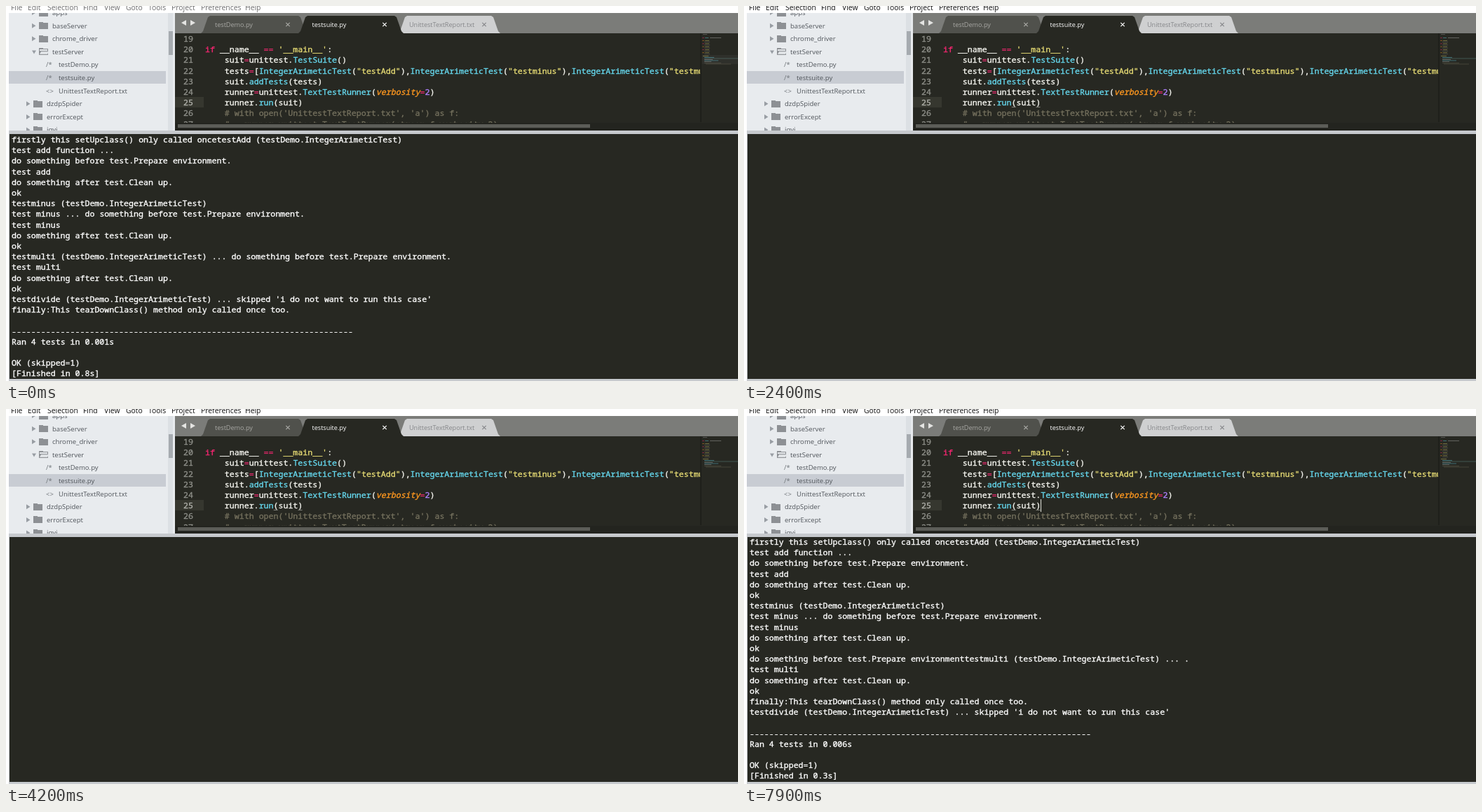
An HTML page with a canvas for the animation above (8 s loop, 1044x536 px).

```html
<!DOCTYPE html>
<html lang="en">
<head>
<meta charset="utf-8">
<title>Test run in an editor</title>
<style>
html, body { margin: 0; width: 100%; height: 100%; overflow: hidden; background: #fff; }
canvas { display: block; width: 1044px; height: 536px; }
</style>
</head>
<body>
<canvas id="stage" width="1044" height="536"></canvas>
<script>
const ctx = document.getElementById('stage').getContext('2d');
const LOOP = 8000, CW = 6.967, LH = 15.2;
const MONO = '11.6px "Noto Sans Mono", "DejaVu Sans Mono", monospace';
const UI = '"Open Sans", "Noto Sans", sans-serif';
const INK = '#f8f8f2', BACK = '#272822', PINK = '#f92672', CYAN = '#66d9ef',
  YELLOW = '#e6db74', ORANGE = '#fd971f', PURPLE = '#ae81ff', NOTE = '#75715e';

function rect(x, y, w, h, color) {
  ctx.fillStyle = color;
  ctx.fillRect(x, y, w, h);
}

function poly(color, ...p) {
  ctx.fillStyle = color;
  ctx.beginPath();
  for (let i = 0; i < p.length; i += 2) ctx.lineTo(p[i], p[i + 1]);
  ctx.fill();
}

function label(text, x, y, size, color) {
  ctx.font = size + 'px ' + UI;
  ctx.fillStyle = color;
  ctx.fillText(text, x, y);
}

// Words sit on the character grid; a hairline stroke adds some weight.
function mono(text, x, y, color, style = '') {
  ctx.font = style + MONO;
  ctx.fillStyle = ctx.strokeStyle = color;
  ctx.lineWidth = 0.35;
  for (const m of text.matchAll(/\S+/g)) {
    const left = x + m.index * CW;
    ctx.fillText(m[0], left, y);
    ctx.strokeText(m[0], left, y);
  }
}

function clip(x, y, w, h, draw) {
  ctx.save();
  ctx.beginPath();
  ctx.rect(x, y, w, h);
  ctx.clip();
  draw();
  ctx.restore();
}

const MENU = [['File', 7], ['Edit', 31], ['Selection', 59], ['Find', 110], ['View', 140],
  ['Goto', 171], ['Tools', 203], ['Project', 236], ['Preferences', 278], ['Help', 341]];

function menu(active) {
  for (const [text, x] of MENU) label(text, x, 5.5, 10.4, active ? '#111' : '#6d6d6d');
}

// name, kind: d = folder, o = open folder, p = script, t = text; indent
const TREE = [['apps', 'd', 8], ['baseServer', 'd', 8], ['chrome_driver', 'd', 8],
  ['testServer', 'o', 8], ['testDemo.py', 'p', 17], ['testsuite.py', 'p', 17],
  ['UnittestTextReport.txt', 't', 17], ['dzdpSpider', 'd', 0], ['errorExcept', 'd', 0],
  ['iqyi', 'd', 0]];

function folder(x, y, open) {
  const c = '#8d9094';
  rect(x, y - 5, 6, 3, c);
  rect(x, y - 4, 13, 9, c);
  if (open) {
    rect(x + 1, y - 3, 11, 2, '#e8ebee');
    poly('#dfe2e5', x + 3, y, x + 14, y, x + 12, y + 4, x + 1, y + 4);
  }
}

function sidebar() {
  rect(4, 10, 237, 168, '#e8ebee');
  rect(231, 10, 7, 168, '#dce0e4');
  rect(232, 36, 6, 34, '#a6abb0');
  rect(4, 93, 224, 18, '#c8ccd3');
  TREE.forEach(([name, kind, indent], i) => {
    const y = 9.6 + i * 18.6, x = 58 + indent;
    label(name, x, y + 3.4, 9.55, '#50555b');
    if (kind === 'p' || kind === 't') {
      label(kind === 'p' ? '/*' : '<>', 57, y + 3.4, 9.5, '#70757a');
      return;
    }
    folder(x - 19, Math.round(y), kind === 'o');
    if (kind === 'o') poly('#989da3', x - 29, y - 2, x - 23, y - 2, x - 26, y + 3);
    else poly('#989da3', x - 29, y - 3.5, x - 23.5, y, x - 29, y + 3.5);
  });
}

function tab(left, right, fill, text, x, color, cross) {
  poly(fill, left, 39, left + 3, 36, left + 10, 16, left + 13, 14,
    right - 13, 14, right - 10, 16, right - 3, 36, right, 39);
  label(text, x, 30.3, 9.1, color);
  ctx.strokeStyle = color;
  ctx.lineWidth = 1.2;
  ctx.beginPath();
  for (const s of [-1, 1]) {
    ctx.moveTo(cross - 2.7, 26.5 - 2.7 * s);
    ctx.lineTo(cross + 2.7, 26.5 + 2.7 * s);
  }
  ctx.stroke();
}

function tabs() {
  rect(241, 10, 803, 29, '#7b7c79');
  poly('#e4e4e2', 257, 20, 257, 28, 250, 24);
  poly('#e4e4e2', 263, 20, 263, 28, 270, 24);
  tab(278, 430, '#50514c', 'testDemo.py', 298, '#a8a8a4', 402);
  tab(559, 705, '#cfd0d1', 'UnittestTextReport.txt', 575, '#86878a', 682);
  tab(417, 567, BACK, 'testsuite.py', 436.5, '#fff', 540);
}

const CASE = 'IntegerArimeticTest';
const caseCall = name => [[CASE, CYAN], ['('], [`"${name}"`, YELLOW], ['),']];
const CODE = [
  [],
  [['if', PINK], [' __name__ '], ['==', PINK], [' '], ["'__main__'", YELLOW], [':']],
  [['    suit'], ['=', PINK], ['unittest.'], ['TestSuite', CYAN], ['()']],
  [['    tests'], ['=', PINK], ['['], ...['testAdd', 'testminus', 'testmulti'].flatMap(caseCall)],
  [['    suit.'], ['addTests', CYAN], ['(tests)']],
  [['    runner'], ['=', PINK], ['unittest.'], ['TextTestRunner', CYAN], ['('],
    ['verbosity', ORANGE, 'italic '], ['=', PINK], ['2', PURPLE], [')']],
  [['    runner.'], ['run', CYAN], ['(suit)']],
  [["    # with open('UnittestTextReport.txt', 'a') as f:", NOTE]],
  [['    #   runner=unittest.TextTestRunner(stream=f,verbosity=2)', NOTE]]
];

function minimap(hint) {
  rect(990, 39, 2, 127, '#1f201b');
  if (hint) rect(993, 70, 51, 13, `rgba(255,255,255,${hint})`);
  ctx.globalAlpha = 0.4;
  rect(994, 40, 6, 1, '#999');
  rect(993, 45, 3, 1, PINK);
  rect(997, 45, 5, 1, CYAN);
  rect(1004, 45, 16, 1, '#bbb');
  for (let i = 0; i < 5; i++) {
    const y = 49 + i * 4.3;
    rect(993, y, 3, 1, i % 2 ? PINK : ORANGE);
    rect(997, y, 6, 1, YELLOW);
    rect(996, y + 2, 8, 1, '#777');
  }
  rect(994, 71, 8, 1, YELLOW);
  rect(996, 73, 14, 1, CYAN);
  rect(996, 74.5, 48, 1, '#6a9b96');
  rect(996, 76, 12, 1, '#aaa');
  rect(996, 77.5, 20, 1, CYAN);
  rect(996, 79, 10, 1, '#aaa');
  rect(996, 81, 24, 1, NOTE);
  rect(998, 82.5, 36, 1, NOTE);
  ctx.globalAlpha = 1;
}

function editor(t) {
  rect(241, 39, 803, 139, BACK);
  rect(241, 130, 41, 15, '#36372f');
  clip(241, 39, 751, 128, () => CODE.forEach((line, i) => {
    const y = 51 + i * LH;
    let x = 284;
    mono(String(19 + i), 253, y, i === 6 ? '#b0b1aa' : '#8f908a');
    for (const [text, color = INK, style] of line) {
      mono(text, x, y, color, style);
      x += text.length * CW;
    }
  }));
  if (t >= 800) for (const col of [10, 15]) rect(312 + col * CW, 144, 6, 1, '#80817a');
  const a = at(CARET, t);
  if (a) rect(423, 129, 1, 18, `rgba(248,248,240,${a})`);
  minimap(at(HINT, t));
  rect(241, 167, 803, 11, '#23241f');
  rect(245, 169, 588, 5, '#5c5d58');
}

const HEAD = `firstly this setUpclass() only called oncetestAdd (testDemo.${CASE})\n`;
const BEFORE = 'do something before test.Prepare environment';
const AFTER = 'do something after test.Clean up.\n';
const PLAIN_ADD = `test add function ...\n${BEFORE}.\ntest add\n${AFTER}ok\n`;
const MINUS = `testminus (testDemo.${CASE})\ntest minus ... ${BEFORE}.\ntest minus\n${AFTER}ok\n`;
const MULTI = `testmulti (testDemo.${CASE}) ... `;
const LATE_MULTI = `${BEFORE}${MULTI}.\n`;
const MULTI_END = `test multi\n${AFTER}ok\n`;
const DIVIDE = `testdivide (testDemo.${CASE}) ... `;
const SKIP = "skipped 'i do not want to run this case'\n";
const LAST = 'finally:This tearDownClass() method only called once too';
const total = (ran, done) =>
  `\n${'-'.repeat(70)}\nRan 4 tests in ${ran}s\n\nOK (skipped=1)\n[Finished in ${done}s]`;

const RUNS = [
  HEAD + PLAIN_ADD + MINUS + MULTI + BEFORE + '.\n' + MULTI_END + DIVIDE + SKIP + LAST + '.\n' + total('0.001', '0.8'),
  HEAD + `test add function\n ... ${BEFORE}ok.\ntest add\n${AFTER}\n` + MINUS + LATE_MULTI + MULTI_END +
    DIVIDE + LAST + SKIP + '.\n' + total('0.002', '0.2'),
  HEAD + PLAIN_ADD + MINUS + LATE_MULTI + MULTI_END + LAST + '.\n' + DIVIDE + SKIP + total('0.006', '0.3')
];

// Pairs of start time and value.
const OUTPUT = [[0, 0], [2400, -1], [2600, 1], [4200, -1], [4400, 2]];
const HINT = [[0, 0.04], [200, 0.02], [400, 0]];
const CARET = [[0, 0], [800, 1], [1200, .4], [1300, 0], [1800, .5], [1900, 1],
  [2100, .9], [2200, .4], [2300, 0], [2700, .3], [2800, .7], [2900, 1],
  [3100, .4], [3200, 0], [3700, .5], [3800, 1], [4100, .4], [4200, 0],
  [4600, .2], [4700, .7], [4800, 1], [5100, 0], [5600, .5], [5700, 1],
  [6000, .5], [6100, .1], [6600, .5], [6700, 1], [7000, .4], [7100, 0],
  [7600, .5], [7700, 1], [7900, .9]];

function at(steps, t) {
  let value = steps[0][1];
  for (const [start, v] of steps) if (t >= start) value = v;
  return value;
}

function output(run) {
  rect(4, 183, 1040, 350, BACK);
  if (run < 0) return;
  const top = run ? 194 : 195;
  clip(4, 183, 1040, 350, () =>
    RUNS[run].split('\n').forEach((line, i) => mono(line, 8, top + i * LH, '#fff')));
}

function draw(t) {
  rect(0, 0, 1044, 536, '#fff');
  menu(t >= 800);
  clip(4, 10, 237, 168, sidebar);
  tabs();
  editor(t);
  rect(4, 178, 1040, 5, '#c6c9cd');
  output(at(OUTPUT, t));
  rect(4, 183, 1, 350, '#c6c9cd');
  rect(4, 533, 1040, 3, '#c6c9cd');
}

const start = performance.now();
function tick() {
  draw((performance.now() - start) % LOOP);
  requestAnimationFrame(tick);
}
tick();
</script>
</body>
</html>
```
